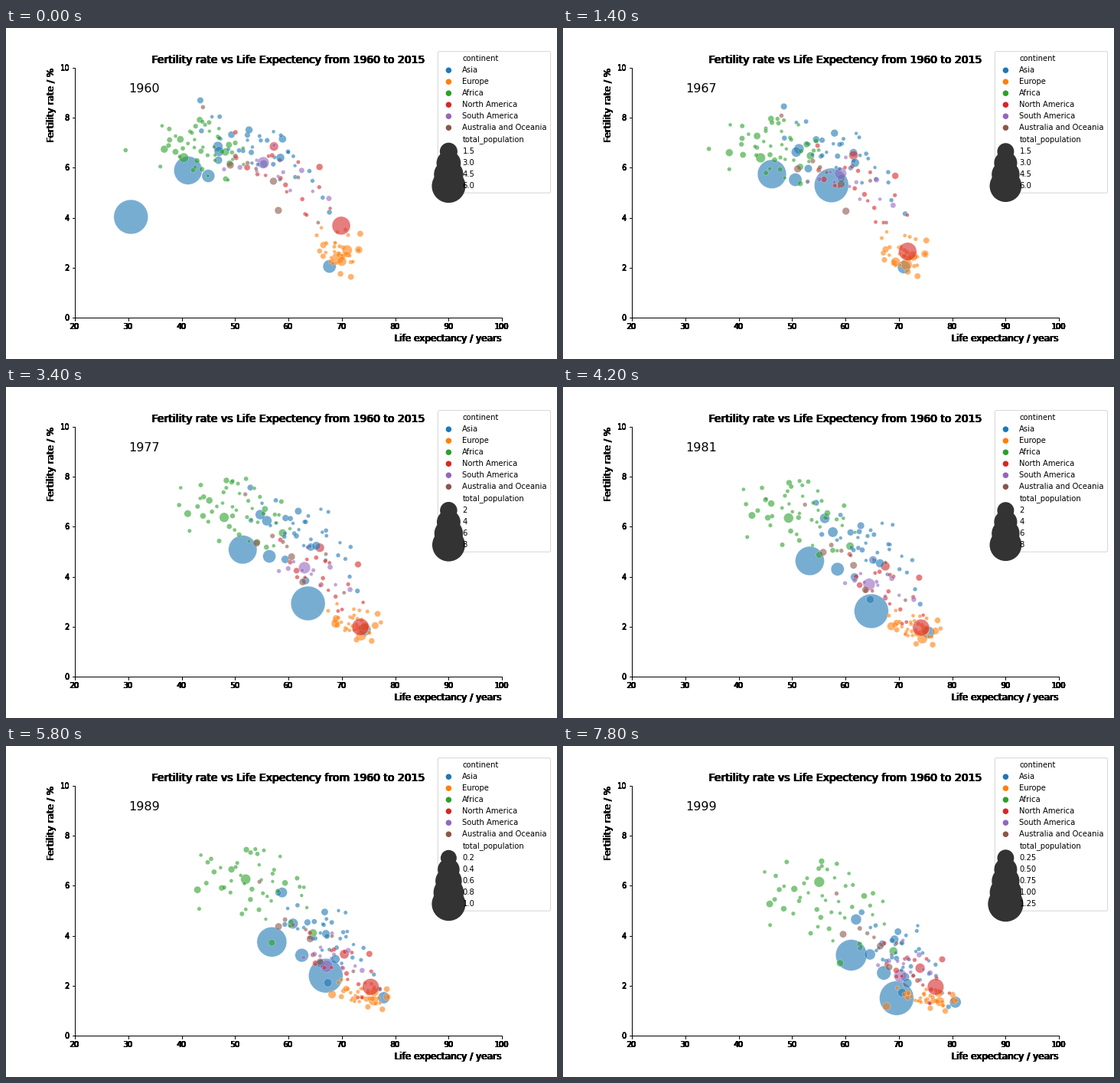
Write a matplotlib script that moves like this. It is 720x432 px and loops after 8 s.

```python
import numpy as np
import matplotlib.pyplot as plt
from matplotlib.animation import FuncAnimation
from matplotlib.patches import FancyBboxPatch

START, COUNT = 1960, 40
T = np.arange(COUNT)
COLORS = {"Asia": "#1f77b4", "Europe": "#ff7f0e", "Africa": "#2ca02c",
          "North America": "#d62728", "South America": "#9467bd",
          "Australia and Oceania": "#8c564b"}
rng = np.random.default_rng(12)
paths = []


def sigmoid(v):
    return 1 / (1 + np.exp(-v))


def gain(a, b):
    """Life expectancy: quick at first, then levelling off."""
    return a + (b - a) * (T / T[-1]) ** 0.8


def turn(a, b, mid, width=6):
    """Fertility: an S-curve from a to b that is steepest in the year mid."""
    s = sigmoid((START + T - mid) / width)
    return a + (b - a) * (s - s[0]) / (s[-1] - s[0])


def dip(at, depth, width):
    return depth * np.exp(-((T - at) / width) ** 2)


def add(cont, life, births, pop):
    paths.append((life, births, pop, COLORS[cont]))


def land(cont, pop, life, births, mid, growth=2.3, width=6):
    add(cont, gain(*life), turn(*births, mid, width), pop * growth ** (T / T[-1]))


def cloud(cont, n, life, births, mid, life_sd, births_sd, slope):
    """Small countries scattered around the trend of their continent."""
    mx, my = gain(*life), turn(*births, mid)
    sx, sy = gain(*life_sd), gain(*births_sd)
    for s in (np.arange(n) + 0.5) / n * 2 - 1:
        u = 1.1 * s + 0.75 * s ** 3 + rng.normal(0, 0.1)
        v = np.clip(rng.normal(), -1.7, 1.7)
        wave = np.sin(rng.uniform(0, 2 * np.pi) + rng.uniform(0.1, 0.3) * T)
        dx = sx * (u + 0.12 * wave)
        pop = np.clip(np.exp(rng.normal(1.2, 1.0)), 0.3, 25)
        add(cont, mx + dx, my + slope * dx + sy * (v + 0.15 * wave),
            pop * np.linspace(1, 1.6, COUNT))


# The largest country sets the top of the size scale
top_pop = np.interp(T, [0, 8, 14, 22, 35, 39], [667, 755, 901, 1003, 1202, 1253])
add("Asia", 59.5 + 10.1 * T / T[-1] - 29 * np.exp(-T / 3.5),
    5.9 - 3.3 * sigmoid((T - 13.5) / 1.6) - 1.2 * sigmoid((T - 33) / 2.5)
    - dip(0.6, 2.4, 1.2) - dip(7, 0.55, 1), top_pop)

land("Asia", 450, (41.2, 61.1), (5.89, 3.22), 1982)
land("Asia", 88, (45, 67.2), (5.67, 2.51), 1983)
land("Asia", 93, (67.7, 80.6), (2.05, 1.34), 1984, growth=1.4)
land("Asia", 49, (46.8, 64.6), (6.85, 3.25), 1987)
land("Asia", 47, (47, 62), (6.65, 4.65), 1993)
land("Asia", 27, (58.9, 69.2), (7.15, 3.85), 1974)
land("Asia", 27, (55.4, 70.6), (6.15, 1.72), 1976)
land("Asia", 28, (46.9, 71.2), (6.3, 2.35), 1979)
land("Africa", 45, (40.4, 55.1), (6.4, 6.15), 1990)
land("Africa", 27, (48.2, 69), (6.63, 3.38), 1983)
land("Africa", 17, (49, 59), (6.17, 2.9), 1984)
land("Africa", 5, (29.5, 49), (6.7, 6.95), 1972)
land("South America", 72, (55.3, 70.3), (6.2, 2.39), 1977)
land("North America", 38, (57.3, 74), (6.85, 2.7), 1979)
land("Europe", 73, (69.3, 77.7), (2.4, 1.36), 1970, growth=1.1)

cloud("Asia", 34, (55, 71), (6.6, 3.2), 1983, (7, 4.6), (0.7, 0.8), -0.11)
cloud("Africa", 45, (43.7, 56), (6.8, 5.4), 1991, (4.6, 6.5), (0.6, 0.85), -0.04)
cloud("Europe", 34, (69.3, 75.2), (2.65, 1.5), 1978, (2.3, 3), (0.5, 0.22), -0.04)
cloud("North America", 18, (59, 73.3), (5.9, 2.7), 1976, (6, 3.8), (0.7, 0.6), -0.14)
cloud("South America", 11, (57.5, 71), (5.8, 3), 1975, (5.8, 3), (0.6, 0.45), -0.13)
cloud("Australia and Oceania", 9, (55, 65), (5.9, 3.9), 1980, (7.3, 5.2), (0.7, 0.5), -0.13)

land("Europe", 43, (70, 67.7), (2.25, 1.17), 1990, growth=1.2)
land("Europe", 52, (71, 77.5), (2.7, 1.7), 1971, growth=1.1)
land("North America", 186, (69.9, 76.9), (3.68, 1.95), 1965, growth=1.5, width=3)
land("Asia", 33, (58.5, 71.6), (6.4, 2.1), 1983)

X, Y, POP = (np.array([p[k] for p in paths]) for k in range(3))
hues = [p[3] for p in paths]

W, H = 720, 432
fig = plt.figure(figsize=(10, 6), dpi=72, facecolor="white")


def make_axes(dx=0, dy=0):
    """Axes, or with a shift in pixels only the lettering along that direction."""
    a = fig.add_axes([0.125 + dx / W, 0.125 + dy / H, 0.775, 0.755])
    a.patch.set_visible(False)
    a.set(xlim=(20, 100), ylim=(0, 10))
    a.set_xticks(range(20, 101, 10))
    a.set_yticks(range(0, 11, 2))
    a.spines[["top", "right"]].set_visible(False)
    if not dy:
        a.set_title("Fertility rate vs Life Expectency from 1960 to 2015", fontsize=14)
        a.set_xlabel("Life expectancy / years", fontsize=12, loc="right")
    if not dx:
        a.set_ylabel("Fertility rate / %", fontsize=12, loc="top")
    if dx or dy:
        a.spines[:].set_visible(False)
        a.tick_params(length=0, pad=7)
        for axis, hidden in ((a.xaxis, dy), (a.yaxis, dx)):
            if hidden:
                axis.set_tick_params(labelcolor="none")
    return a


# Stacked copies thicken the lettering
for shift in ((-1, 0), (-1, 0), (0, 1), (0, 0), (0, 0), (0, 0)):
    make_axes(*shift)
ax = make_axes()
dots = ax.scatter(X[:, 0], Y[:, 0], c=hues, alpha=0.6, edgecolors="white", linewidths=0.4)
year_text = ax.text(30, 9, "", fontsize=16)

# Legend in pixel coordinates
pix = fig.add_axes([0, 0, 1, 1])
pix.set(xlim=(0, W), ylim=(H, 0))
pix.axis("off")
frame = FancyBboxPatch((564.4, 31), 147.2, 184, boxstyle="round,pad=0,rounding_size=2",
                       fc="white", ec="0.8", lw=1, alpha=0.8)
pix.add_patch(frame)
marks = pix.scatter([], [], linewidths=1.5)
labels = [pix.text(596.4, 0, "", fontsize=10, zorder=5) for _ in range(13)]


def area(pop, top):
    return 20 + 1980 * pop / top


def size_ticks(top):
    step = next(s for s in (150, 200, 250) if s >= top / 6)
    ticks = np.arange(step, top, step)
    unit = 1000 if ticks[-1] >= 1000 else 100
    digits = {150: 1, 200: 1 if unit == 1000 else 0, 250: 2}[step]
    return ticks, [f"{t / unit:.{digits}f}" for t in ticks]


def draw_legend(top):
    ticks, names = size_ticks(top)
    rows = ["continent", *COLORS, "total_population", *names]
    base = 209.1 - 15 * np.arange(len(rows))[::-1]
    base[:8] -= 1
    for i, label in enumerate(labels):
        shown = i < len(rows)
        label.set_text(rows[i] if shown else "")
        label.set_y(base[i] if shown else 0)
    box_top = base[0] - 12.5
    frame.set_bounds(564.4, box_top, 147.2, 215.2 - box_top)
    spots = np.concatenate([base[1:7], base[8:]]) - 2.9
    tints = [*COLORS.values()] + ["#333333"] * len(ticks)
    marks.set_offsets(np.column_stack([np.full(len(spots), 578.4), spots]))
    marks.set_sizes(np.concatenate([np.full(6, 36), area(ticks, top)]))
    marks.set_facecolor(tints)
    marks.set_edgecolor(tints)


def update(i):
    top = top_pop[i]
    dots.set_offsets(np.column_stack([X[:, i], Y[:, i]]))
    dots.set_sizes(area(POP[:, i], top))
    year_text.set_text(str(START + i))
    draw_legend(top)
    return dots, year_text, marks, frame, *labels


anim = FuncAnimation(fig, update, frames=COUNT, interval=200, repeat=True,
                     repeat_delay=0, init_func=lambda: update(0), blit=False)
plt.show()
```
